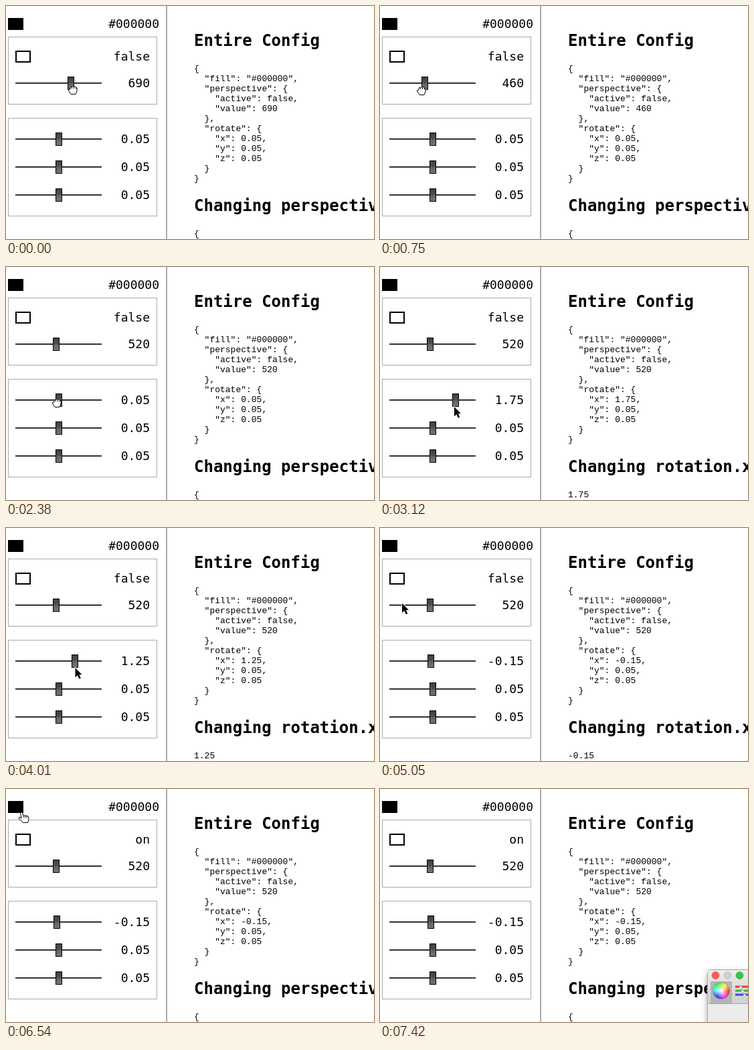
These frames come from a looping animation (550x350 px, 8 s). An HTML page:

```html
<!DOCTYPE html>
<html lang="en">
<head>
<meta charset="utf-8">
<title>Config panel</title>
<style>
html, body { margin: 0; width: 100%; height: 100%; overflow: hidden; background: #fff; }
svg { display: block; }
text { white-space: pre; }
.value { font: 18px "DejaVu Sans Mono", monospace; text-anchor: end; }
.title { font: bold 24px "DejaVu Sans Mono", monospace; }
.code { font: 13px "Liberation Mono", monospace; }
.panel { fill: none; stroke: #aaa; }
.cursor path { stroke-linejoin: round; }
.hand { fill: #fff; stroke: #000; }
</style>
</head>
<body>
<svg width="550" height="350" viewBox="0 0 550 350">
  <defs>
    <linearGradient id="knob" x2="0" y2="1">
      <stop stop-color="#404040"/><stop offset=".5" stop-color="#505050"/>
      <stop offset=".5" stop-color="#606060"/><stop offset="1" stop-color="#777"/>
    </linearGradient>
    <linearGradient id="bar" x2="0" y2="1">
      <stop stop-color="#ececec"/><stop offset="1" stop-color="#d0d0d0"/>
    </linearGradient>
    <radialGradient id="glow">
      <stop stop-color="#fff"/><stop offset="1" stop-color="#fff" stop-opacity="0"/>
    </radialGradient>
    <filter id="shadow" x="-30%" y="-30%" width="160%" height="160%">
      <feDropShadow dx="0" dy="4" stdDeviation="5" flood-opacity=".35"/>
    </filter>
  </defs>

  <rect x="3" y="18" width="23" height="18"/>
  <rect class="panel" x="3.5" y="46.5" width="222" height="101"/>
  <rect class="panel" x="3.5" y="168.5" width="222" height="147"/>
  <rect x="15" y="68" width="21" height="16" fill="#fff" stroke="#000" stroke-width="2"/>
  <rect x="239" width="2" height="350" fill="#aaa"/>
  <text class="value" x="229" y="33">#000000</text>
  <text class="value" x="215" y="82" id="active"></text>
  <g id="sliders"></g>

  <text class="title" x="281" y="60">Entire Config</text>
  <g id="config"></g>
  <text class="title" x="281" y="308" id="heading"></text>
  <text class="code" x="281" y="346" id="detail"></text>

  <g id="picker">
    <rect x="489.5" y="271.5" width="200" height="200" rx="5" fill="#ececec" stroke="#aaa" filter="url(#shadow)"/>
    <path d="M490 322V277q0-5 5-5H550V322Z" fill="url(#bar)"/>
    <path d="M490 322.5H550" stroke="#aaa"/>
    <rect x="494" y="289" width="32" height="33" fill="#b4b4b4"/>
    <circle cx="501.500" cy="280" r="5.500" fill="#fc5b57" stroke="#e2463f" stroke-width=".6"/>
    <circle cx="519.500" cy="280" r="5.500" fill="#cfcfcf" stroke="#b8b8b8" stroke-width=".6"/>
    <circle cx="537.500" cy="280" r="5.500" fill="#34c84a" stroke="#27aa35" stroke-width=".6"/>
    <g id="wheel"></g>
    <circle cx="510" cy="303" r="12.500" fill="url(#glow)" stroke="#888" stroke-width=".6"/>
    <g id="bars"></g>
  </g>

  <g id="cursor" class="cursor">
    <path id="arrow" d="M0 0V14.500L3.300 11.300L5.800 16.700L8.300 15.600L5.800 10.300H10Z" stroke="#fff" stroke-width="2" paint-order="stroke"/>
    <path id="point" class="hand" d="M-1.500.5Q0-1 1.500.8L3 5Q4.500 3.600 5.600 5Q7 4 8 5.600Q10 5 10.500 7L11 11L9.500 15.500H2.500L-3.500 9.500Q-4.500 7-2 7.500L0 9ZM3 5V8M5.600 5V8M8 5.600V8.500"/>
    <path id="grab" class="hand" d="M-4-3Q-3.500-6-1.500-4.500Q0-6.500 1.500-4.800Q3.500-6 4.500-4Q6.500-4.200 6.300-1L5.500 3L4 6.500H-3L-6.500 1Q-7-1.500-4-1ZM-1.500-4.500V-2M1.500-4.800V-2M4.500-4V-1.500"/>
  </g>
</svg>
<script>
const LOOP = 8000, STEP = 148.5;
const $ = id => document.getElementById(id);

// Keys: [step, value, ...]
const perspective = [[0, 690], [5, 460], [7, 260], [8, 360], [10, 520]];
const rotation = [[16, .05], [18, -2.45], [19, -1.75], [21, 1.75], [23, 2.65], [31, -.15]];
const pointer = [
  [0, 100, 126], [5, 62, 127], [7, 37, 130], [8, 51, 141], [10, 75, 128], [11, 75, 128],
  [12, 74, 133], [15, 75, 190], [16, 76, 204], [18, 30, 204], [19, 41, 204], [21, 111, 210],
  [23, 130, 212], [31, 77, 208], [32, 77, 208], [33, 58, 165], [34, 33, 113], [37, 20, 60],
  [39, 25, 73], [42, 25, 73], [44, 23, 35], [45, 12, 18], [46, 12, 22]
];

function at(keys, n, i = 1) {
  const k = keys.findIndex(key => key[0] > n);
  if (k < 0) return keys[keys.length - 1][i];
  if (k === 0) return keys[0][i];
  const a = keys[k - 1], b = keys[k];
  return a[i] + (b[i] - a[i]) * (n - a[0]) / (b[0] - a[0]);
}

const sliderY = [116, 200, 242, 284];
$("sliders").innerHTML = sliderY.map((y, i) => `
  <rect x="14" y="${y - 1}" width="129" height="1.6"/>
  <rect id="knob${i}" y="${y - 9.5}" width="9" height="19" fill="url(#knob)" stroke="#000"/>
  <text class="value" x="215" y="${y + 6}" id="value${i}"></text>`).join("");

$("config").innerHTML = Array.from({ length: 12 }, (_, i) =>
  `<text class="code" x="281" y="${98 + 15 * i}" id="line${i}"></text>`).join("");

$("wheel").innerHTML = Array.from({ length: 36 }, (_, i) =>
  `<path d="M510 303h12.500a12.500 12.500 0 0 1-.15 2.300Z" fill="hsl(${-10 * i} 95% 52%)" transform="rotate(${10 * i} 510 303)"/>`).join("");

$("bars").innerHTML = ["#f03030", "#35b83c", "#3348e8"].map((color, i) => {
  const y = 297 + 6 * i;
  return `<rect x="531" y="${y - 1.5}" width="24" height="3" fill="${color}"/>
    <circle cx="${539 + 3 * i}" cy="${y + 1}" r="2" fill="#fff" stroke="#999" stroke-width=".5"/>`;
}).join("");

function setSlider(i, text, min, max) {
  $("knob" + i).setAttribute("x", Math.round(14 + 119 * (text - min) / (max - min)) + .5);
  $("value" + i).textContent = text;
}

const show = (id, on) => $(id).style.display = on ? "" : "none";

function draw(now) {
  const n = Math.floor((now % LOOP + 5) / STEP);
  const depth = Math.round(at(perspective, n) / 10) * 10;
  const x = (Math.round((at(rotation, n) - .05) * 10) / 10 + .05).toFixed(2);
  const rotating = n >= 17 && n < 39;

  setSlider(0, depth, 100, 1000);
  [x, "0.05", "0.05"].forEach((v, i) => setSlider(i + 1, v, -3, 3));
  $("active").textContent = n < 39 ? "false" : "on";
  $("heading").textContent = "Changing " + (rotating ? "rotation.x" : "perspective");
  $("detail").textContent = rotating ? x : "{";

  const config = {
    fill: "#000000",
    perspective: { active: false, value: depth },
    rotate: { x: +x, y: .05, z: .05 }
  };
  JSON.stringify(config, null, 2).split("\n").forEach((line, i) => $("line" + i).textContent = line);

  const kind = n <= 7 || n >= 16 && n <= 20 ? "grab" : n >= 36 && n <= 46 ? "point" : "arrow";
  for (const id of ["arrow", "point", "grab"]) show(id, id === kind);
  show("cursor", n < 50);
  $("cursor").setAttribute("transform", `translate(${at(pointer, n)} ${at(pointer, n, 2)})`);
  show("picker", n >= 48);
  requestAnimationFrame(draw);
}
draw(0);
</script>
</body>
</html>
```
